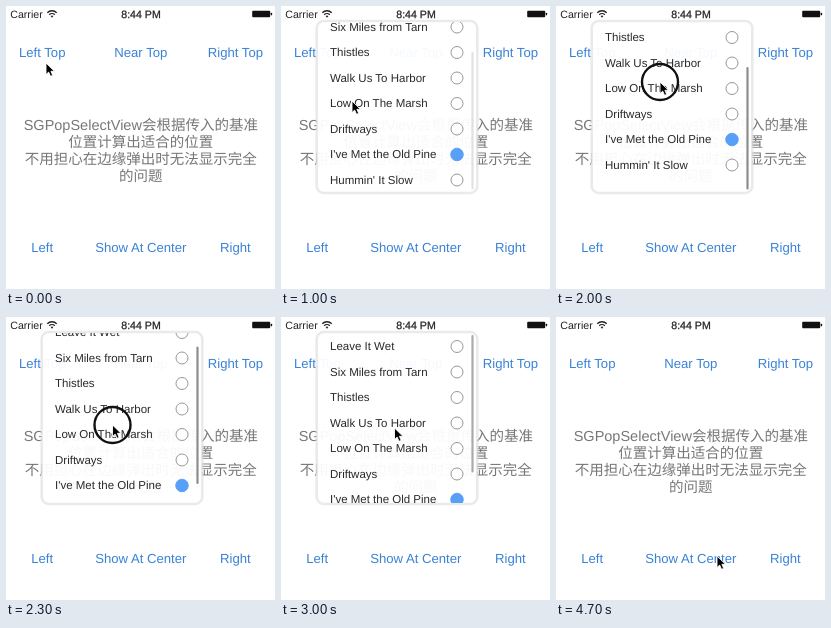
An HTML page that plays this animation: 269 by 283 pixels, repeating every 4.8 s.

```html
<!DOCTYPE html>
<html lang="zh">
<head>
<meta charset="utf-8">
<title>Pop select view</title>
<style>
html, body { margin: 0; width: 100%; height: 100%; overflow: hidden; background: #fff; }
svg { display: block; width: 100%; height: 100%; font-family: "Liberation Sans", Arial, sans-serif; text-rendering: geometricPrecision; }
.bar { font-size: 10.6px; fill: #222; }
.link { font-size: 13.15px; fill: #3a82d6; text-anchor: middle; }
.note { font: 300 14.5px "Liberation Sans", "Noto Sans CJK SC", "Noto Sans CJK", sans-serif; fill: #777; text-anchor: middle; }
.row { font-size: 11.5px; fill: #2a2a2a; }
</style>
</head>
<body>
<svg viewBox="0 0 269 283">
  <defs><clipPath id="window"><rect x="37" y="16" width="157" height="170" rx="4"/></clipPath></defs>
  <rect width="269" height="283" fill="#fff"/>
  <g class="bar">
    <text x="4.3" y="11.6">Carrier</text>
    <text x="135" y="11.6" text-anchor="middle" stroke="#222" stroke-width=".25">8:44 PM</text>
  </g>
  <g fill="none" stroke="#222" stroke-width="1.3">
    <path d="M41.3 6.7a6.6 6.6 0 0 1 9.4 0M43.2 8.7a4 4 0 0 1 5.6 0"/>
    <path d="M44.6 10.1a2 2 0 0 1 2.8 0L46 11.8z" fill="#222" stroke="none"/>
  </g>
  <rect x="246.2" y="4.8" width="18" height="6.4" rx="1" fill="#111"/>
  <rect x="264.8" y="6.7" width="1.3" height="2.6" rx=".6" fill="#111"/>
  <g id="page"></g>
  <g id="popup">
    <rect x="35.7" y="15" width="160.6" height="172" rx="7" fill="#fff" fill-opacity=".95" stroke="#dcdcdc" stroke-opacity=".6" stroke-width="2.6"/>
    <g clip-path="url(#window)"><g id="list"></g></g>
    <rect id="thumb" x="190.4" width="2.2" rx="1.1" fill="#000"/>
  </g>
  <g id="cursor">
    <circle id="ring" r="18" fill="none" stroke="#111" stroke-width="2.4"/>
    <path d="M0 0V11.6L2.7 9.1L4.5 13.3L6.7 12.4L4.9 8.3H8.5Z" fill="#000" stroke="#fff" stroke-width=".9" stroke-linejoin="round"/>
  </g>
</svg>
<script>
const LOOP = 4800, TICK = 100, ROW = 25.5, OVERFLOW = 34;
const titles = ["Leave It Wet", "Six Miles from Tarn", "Thistles", "Walk Us To Harbor",
  "Low On The Marsh", "Driftways", "I've Met the Old Pine", "Hummin' It Slow"];
const buttons = [["Left Top", "Near Top", "Right Top"], ["Left", "Show At Center", "Right"]];
const notes = ["SGPopSelectView会根据传入的基准", "位置计算出适合的位置", "不用担心在边缘弹出时无法显示完全", "的问题"];
const $ = id => document.getElementById(id);

function set(el, attrs) {
  for (const key in attrs) el.setAttribute(key, attrs[key]);
}
function add(parent, tag, attrs, text = "") {
  const el = document.createElementNS("http://www.w3.org/2000/svg", tag);
  set(el, attrs);
  el.textContent = text;
  return parent.appendChild(el);
}

buttons.forEach((line, row) => line.forEach((text, col) =>
  add($("page"), "text", { class: "link", x: 36.2 + col * 96.6 + (col === 1 ? 2 : 0), y: 50.8 + row * 194.7 }, text)));
notes.forEach((text, i) =>
  add($("page"), "text", { class: "note", x: 134.8, y: 123.5 + i * 17.2 }, text));
const firstLink = $("page").firstElementChild;

const dots = titles.map((text, i) => {
  const y = 29.5 + i * ROW;
  add($("list"), "text", { class: "row", x: 49, y: y + 3.8 }, text);
  return add($("list"), "circle", { cx: 176, cy: y, "stroke-width": .9 });
});

const clamp = (v, lo, hi) => Math.min(hi, Math.max(lo, v));
function ease(t, from, to) {
  const k = clamp((t - from) / (to - from), 0, 1);
  return k * k * (3 - 2 * k);
}
const during = (t, from, to) => t >= from && t < to;

// Resting points of the pointer: time, x, y.
const stops = [[0, 40, 57], [500, 44, 43], [1000, 71, 95], [1700, 104, 106], [2000, 104, 76],
  [2600, 109, 140], [3400, 118, 82], [4000, 124.5, 142], [4700, 161, 239]];

function pointer(t) {
  let [, x, y] = stops[0];
  stops.slice(1).forEach(([end, x1, y1], i) => {
    const k = ease(t, stops[i][0], end);
    x += (x1 - x) * k;
    y += (y1 - y) * k;
  });
  return [x, y];
}

// Fling to the end, a small bounce, pull past the end, pull past the top, settle.
const scrollAt = t => OVERFLOW * ease(t, 700, 1000)
  + 10 * (ease(t, 1100, 1400) - ease(t, 1400, 1700))
  + 15 * ease(t, 1700, 2000) - 54 * ease(t, 2000, 2500) + 5 * ease(t, 2600, 2900);

const thumbAt = t => .45 * (ease(t, 700, 800) - ease(t, 900, 1050)
  + ease(t, 1100, 1250) - ease(t, 2850, 3300));

const pressed = t => during(t, 500, 600) || during(t, 1700, 2500)
  || during(t, 3400, 3700) || during(t, 4300, 4400);

function draw(t) {
  const [x, y] = pointer(t), s = scrollAt(t);
  const shown = ease(t, 400, 800), gone = ease(t, 4200, 4700);
  const zoom = 1.03 - .03 * shown + .09 * gone;
  set($("cursor"), { transform: `translate(${x} ${y})` });
  set($("ring"), { visibility: pressed(t) ? "visible" : "hidden" });
  set($("popup"), {
    opacity: shown - gone,
    transform: `translate(116 101) scale(${zoom}) translate(-116 -101)`
  });
  set($("list"), { transform: `translate(0 ${-s})` });

  const shift = clamp(s / OVERFLOW, 0, 1) * 28;
  const top = 18 + shift + Math.max(0, s - OVERFLOW);
  const bottom = 155.5 + shift + Math.min(0, s) / 2;
  set($("thumb"), { y: top, height: bottom - top, "fill-opacity": thumbAt(t) });

  const chosen = t < 3400 ? 6 : t < 3600 ? -1 : 2;
  dots.forEach((dot, i) => set(dot, i === chosen
    ? { r: 6.3, fill: "#589ff8", stroke: "#589ff8" }
    : { r: 6, fill: "#fff", stroke: "#8c8c8c" }));
  set(firstLink, { opacity: during(t, 500, 700) ? .35 : 1 });
}

const start = performance.now();
function frame() {
  const t = (performance.now() - start) % LOOP;
  draw(Math.floor(t / TICK) * TICK);
  requestAnimationFrame(frame);
}
frame();
</script>
</body>
</html>
```
